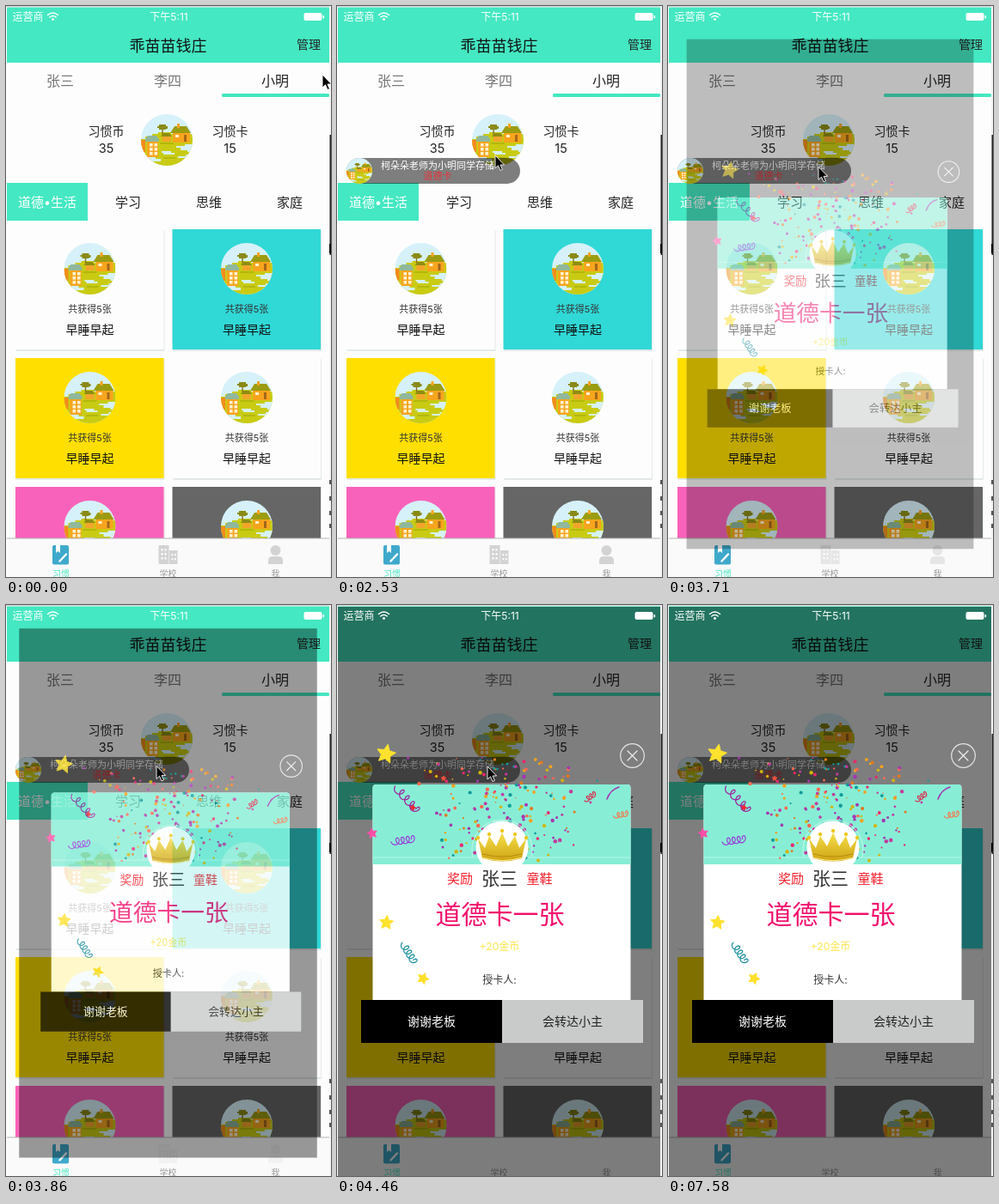
An HTML page for the animation above (7680 ms loop, 378 by 665 pixels).

```html
<!DOCTYPE html>
<html lang="zh-CN">
<head>
<meta charset="utf-8">
<title>习惯卡</title>
<style>
html, body { margin: 0; width: 100%; height: 100%; overflow: hidden; background: #fdfdfd; }
svg { display: block; width: 100vw; height: 100vh; }
text { font-family: Inter, "Noto Sans CJK SC", "Noto Sans CJK", sans-serif; text-anchor: middle; }
</style>
</head>
<body>
<svg id="stage" viewBox="0 0 378 665"></svg>
<script>
const LOOP = 7680, STEP = 148.3;
const MINT = '#44e8c2';
const $ = id => document.getElementById(id);

const rect = (x, y, w, h, fill, extra = '') =>
  `<rect x="${x}" y="${y}" width="${w}" height="${h}" fill="${fill}" ${extra}/>`;
const circle = (x, y, r, fill, extra = '') =>
  `<circle cx="${x}" cy="${y}" r="${r}" fill="${fill}" ${extra}/>`;
const path = (d, fill, extra = '') => `<path d="${d}" fill="${fill}" ${extra}/>`;
const line = (d, color, width = 1) =>
  path(d, 'none', `stroke="${color}" stroke-width="${width}" stroke-linecap="round"`);
// y is the visual middle of the line
const label = (s, x, y, size, fill, weight = 400) =>
  `<text x="${x}" y="${y + size * 0.37}" font-size="${size}" fill="${fill}" font-weight="${weight}">${s}</text>`;
const avatar = (x, y, r = 30) =>
  `<use href="#avatar" transform="translate(${x} ${y}) scale(${r / 30})"/>`;

function scene() {
  const sky = '#d6f1f9', orange = '#f7a51d', roof = '#9c9c10';
  let windows = '';
  for (let i = 0; i < 6; i++)
    windows += rect(-20 + (i % 2) * 5.5, 4 + (i >> 1) * 5, 3.6, 3.6, '#fff3d0');
  return `<clipPath id="round">${circle(0, 0, 30, '#000')}</clipPath>
  <g id="avatar"><g clip-path="url(#round)">
    ${rect(-30, -30, 60, 60, sky)}
    ${path('M-30 -1H-25V-4H-17V-7H-10V-9H5V-7H30V30H-30Z', '#c9cb13')}
    ${path('M-30 18h9v2h8v2h6v3h-11v2h-12zM30 5h-9v2h-10v2h5v3h8v2h6zM30 17h-8v2h-9v2h17zM-6 13h11v2h4v2h-13v-2h-2z', sky)}
    ${path('M-8 3H8V5H-8zM-4 20H10V22H-4z', '#b3b80c')}
    ${line('M-5 -13V-7', '#8a6a20', 1.4)}
    ${path('M-11 -14v-2h2v-2h8v2h2v3h-2v1h-8v-2z', '#8a8a14')}
    ${rect(-23, 0, 13, 20, orange)}${windows}
    ${path('M-25 2V-1L-22 -5H-12L-9 -1V2Z', '#8fb89c')}
    ${rect(-30, 0, 5, 14, '#f28c1c')}
    ${rect(7, -9, 20, 12, orange)}
    ${path('M4 -8L9 -16H23L28 -8Z', roof)}
    ${rect(12, -19, 3, 5, orange)}
    ${rect(10, -6, 4, 3, '#fff3d0')}${rect(20, -6, 3, 8, '#a5681a')}
    ${rect(-5, -4, 10, 6, '#f3a52a')}${path('M-7 -4L-4 -8H3L6 -4Z', '#8d8d12')}
  </g></g>`;
}

const card = (x, y, fill) =>
  rect(x + 0.5, y + 1, 173, 141, '#e3eae8', 'rx="1"') + rect(x, y, 172.5, 140, fill) +
  avatar(x + 86.5, y + 46) +
  label('共获得5张', x + 86.5, y + 93, 11, '#333') +
  label('早睡早起', x + 86.5, y + 117, 14, '#111');

function page() {
  const dark = '#222', white = '#fdfdfd';
  return rect(0, 0, 378, 665, white) + rect(0, 0, 378, 1, '#d5d5d5') +
    rect(1, 1.5, 375, 64.5, MINT) +
    label('乖苗苗钱庄', 188.5, 46, 18, '#111', 500) + label('管理', 352, 45, 14, dark) +
    label('张三', 63, 87, 16, '#777') + label('李四', 188, 87, 16, '#777') +
    label('小明', 313, 87, 16, dark, 500) + rect(251, 102, 125, 4, MINT, 'rx="1.5"') +
    label('习惯币', 116.5, 146, 14, dark) + label('35', 116.5, 166, 14.5, dark) +
    label('习惯卡', 260.5, 146, 14, dark) + label('15', 260.5, 166, 14.5, dark) +
    avatar(187, 156) +
    rect(1, 206, 94, 44, MINT) + label('道德•生活', 48, 228, 15, '#fff', 500) +
    ['学习', '思维', '家庭'].map((s, i) => label(s, 142 + 94 * i, 228, 15, dark, 500)).join('') +
    card(11, 260, white) + card(193.5, 260, '#30d8d6') +
    card(11, 410, '#ffdf00') + card(193.5, 410, white) +
    card(11, 560, '#f962ba') + card(193.5, 560, '#666');
}

function tabBar() {
  const gray = '#d3d3d3';
  let holes = '';
  for (let i = 0; i < 6; i++) holes += rect(180.5 + (i % 2) * 4, 632 + (i >> 1) * 5, 2, 2.5, '#fff');
  for (let i = 0; i < 4; i++) holes += rect(192.5 + (i % 2) * 3.5, 638 + (i >> 1) * 5, 1.8, 2.2, '#fff');
  return rect(1, 620, 375, 45, '#fafafa') + rect(1, 619.5, 375, 1, '#b5b5b5') +
    rect(54, 628, 19, 22.5, '#3fa9cb', 'rx="2"') +
    path('M58 628h5v9l-2.5 -2l-2.5 2z', '#fff') + line('M62.5 646.5L70 638.5', '#fff', 2.4) +
    `<g id="tabIcons">${rect(177.5, 628, 12, 22, gray)}${rect(190, 634, 9.5, 16, gray)}${holes}
     ${circle(313.5, 634, 6, gray)}${path('M305 650v-4q0 -5 5 -5h7q5 0 5 5v4z', gray)}</g>` +
    label('习惯', 64, 661.5, 10, MINT) + label('学校', 188.5, 661.5, 10, '#999') +
    label('我', 313.5, 661.5, 10, '#999');
}

const bubble = () => `<g id="bubble">${rect(0, 177, 202, 30, '#000', 'rx="15" fill-opacity=".5"')}
  ${avatar(15, 192, 15)}${label('柯朵朵老师为小明同学存储', 106, 186, 11, '#fff')}
  ${label('道德卡', 106, 197.5, 11, '#e8343c')}</g>`;

function star(x, y, r, fill, turn) {
  let pts = '';
  for (let i = 0; i < 10; i++) {
    const a = turn + i * Math.PI / 5, k = i % 2 ? r * 0.48 : r;
    pts += `${(x + k * Math.sin(a)).toFixed(1)},${(y - k * Math.cos(a)).toFixed(1)} `;
  }
  return `<polygon points="${pts}" fill="${fill}" stroke="${fill}" stroke-linejoin="round"/>`;
}

function coil(x, y, length, r, turns, angle, color) {
  let d = '';
  for (let i = 0; i <= turns * 14; i++) {
    const u = i / (turns * 14), a = u * turns * 2 * Math.PI;
    d += `${i ? 'L' : 'M'}${((u - 0.5) * length - r * 0.8 * Math.cos(a)).toFixed(1)} ${(r * Math.sin(a)).toFixed(1)}`;
  }
  return `<g transform="translate(${x} ${y}) rotate(${angle})">${line(d, color, 1.2)}</g>`;
}

function confetti() {
  const colors = ['#f2a11f', '#e8286c', '#a436b0', '#109c9c', '#ff6a50', '#d2b40c', '#c23ca0', '#e07a20'];
  let seed = 11, out = '';
  const rnd = () => (seed = seed * 16807 % 2147483647) / 2147483647;
  for (let i = 0; i < 210; i++) {
    const v = rnd(), x = 198 + (rnd() + rnd() - 1) * (122 - 40 * v);
    out += circle(x.toFixed(1), (178 + 120 * v).toFixed(1), (0.8 + rnd() * 1.5).toFixed(1),
      colors[Math.floor(rnd() * colors.length)]);
  }
  return out;
}

function crown() {
  const tips = [[164, 271], [177, 267], [192, 263], [207, 267], [220, 271]];
  return path('M164 272L172 283L177 269L185 281L192 265L199 281L207 269L212 283L220 272L215 295Q192 302 169 295Z',
      'url(#gold)') +
    line('M169 290Q192 296 215 290', '#b98d10', 1.2) + line('M170 294.5Q192 301 214 294.5', '#f9ec8c', 1.2) +
    tips.map(([x, y]) => circle(x, y, 2.2, '#ecc91f')).join('');
}

function modal() {
  const red = '#f5222d';
  return `<linearGradient id="gold" x2="0" y2="1"><stop stop-color="#f6e04a"/><stop offset="1" stop-color="#cfa313"/></linearGradient>
  <g id="modal">` +
    rect(1, 2, 375, 667, '#000', 'fill-opacity=".5"') +
    path('M41.5 460V213q0 -4 4 -4H337.5q4 0 4 4V460Z', '#fff') +
    path('M41.5 302V213q0 -4 4 -4H337.5q4 0 4 4V302Z', '#87eed5') +
    rect(41.5, 293.5, 300, 1, '#b5f5e6') + confetti() +
    path('M158 293.5A35 35 0 1 1 226 293.5', 'none', 'stroke="#c4f7ea"') +
    circle(192, 282, 30.5, '#fff') + crown() +
    star(57, 173.5, 11.5, '#ffe22e', 0.2) + star(57.5, 370, 8.5, '#ffe22e', 0.1) +
    star(100, 435, 7, '#ffdf2a', 0.4) + star(41, 266, 6, '#ff4fa8', -0.2) +
    star(88, 236, 3.5, '#f5222d', 0.3) + star(124, 202, 3, '#f0503c', 0) +
    coil(82, 227, 36, 4.5, 4, 48, '#a01c9c') + coil(78, 274, 24, 4, 4, -8, '#9a3ad8') +
    coil(84, 406, 24, 4, 4, 58, '#1c8fa0') + coil(295, 223, 13, 2.8, 3, -35, '#d83050') +
    coil(331, 244, 15, 3, 3, -10, '#f07a50') + line('M314 226Q318 215 328 212', '#a436b0', 1.6) +
    circle(343.5, 175.5, 13.8, 'none', 'stroke="#e4e4e4" stroke-width="1.2"') +
    line('M338 170L349 181M349 170L338 181', '#eee', 1.2) +
    label('奖励', 143, 318.5, 15, red) + label('张三', 189, 318.5, 21, '#333') +
    label('童鞋', 235.5, 318.5, 15, red) +
    label('道德卡一张', 189.5, 360, 30, '#f2106c') +
    label('+20金币', 189, 397.5, 12, '#fbe64a') + label('授卡人:', 189, 436.5, 12, '#333') +
    rect(28, 460, 164, 50, '#000') + rect(192, 460, 164, 50, '#c9cbca') +
    label('谢谢老板', 110, 485, 14, '#fff') + label('会转达小主', 274, 485, 14, '#222') + '</g>';
}

const statusBar = () => label('运营商', 25.5, 12.5, 12, '#fff') + label('下午5:11', 189.5, 12.5, 12, '#fff') +
  line('M48.5 10.5Q54.5 5.5 60.5 10.5M50.8 13Q54.5 10 58.2 13', '#fff', 1.6) +
  circle(54.5, 15.5, 1.6, '#fff') +
  rect(346.5, 8, 21, 9, '#fff', 'rx="2"') + rect(368.5, 11, 1.6, 3.5, '#fff', 'rx=".8"');

// sliver of the window behind the phone
const behind = () => rect(376, 0, 2, 665, '#f4f4f4') + rect(376.5, 150, 1.5, 140, '#222') +
  rect(376, 277, 2, 11, '#000') + [552, 571, 588, 603].map(y => rect(376, y, 2, 5, '#555')).join('');

const cursor = () => path('M0 0V15L3.5 11.8L6 17.5L8.4 16.4L6 11H10.6Z', '#000',
  'id="cursor" stroke="#fff" stroke-width=".9"');

$('stage').innerHTML = `<defs>${scene()}</defs>` + page() + tabBar() + bubble() + modal() +
  statusBar() + behind() + cursor();

// keys: [step, ...values]
function follow(keys, k) {
  const i = keys.findIndex(p => p[0] > k);
  if (i === 0) return keys[0].slice(1);
  if (i < 0) return keys[keys.length - 1].slice(1);
  const a = keys[i - 1], b = keys[i], u = (k - a[0]) / (b[0] - a[0]);
  return a.slice(1).map((v, j) => v + (b[j + 1] - v) * u);
}

const POINTER = [[0, 368, 80], [8, 356, 44], [9, 354, 43], [15, 186, 180], [17, 184, 174],
  [20, 180, 166], [23, 175, 187], [30, 175, 188], [34, 357, 184], [36, 357, 184], [42, 305, 608]];
const POP = [[22.7, 0.1], [23, 0.387], [24, 0.846], [25, 0.89], [26, 0.924], [28, 0.975], [30, 1]];

// remaining distance of a damped spring, 1 to 0
function spring(sec) {
  if (sec <= 0) return 1;
  const z = 0.755, w = 9.3, d = Math.sqrt(1 - z * z), a = w * d * sec;
  return Math.exp(-z * w * sec) * (Math.cos(a) + z / d * Math.sin(a));
}

function ease(u) {
  u = Math.max(0, Math.min(1, u));
  return u * u * (3 - 2 * u);
}

function draw(ms) {
  const k = Math.floor(ms / STEP);

  const left = spring((k * STEP - 1085) / 1000);
  $('bubble').setAttribute('transform', `translate(${11 + 367 * left} 0)`);
  $('bubble').setAttribute('opacity', Math.min(1, 1.08 * (1 - left)));

  const alpha = ease((k - 22.6) / 4.8);
  const [s] = follow(POP, k);
  $('modal').setAttribute('opacity', alpha);
  $('modal').setAttribute('transform', `translate(188.5 335.5) scale(${s}) translate(-188.5 -335.5)`);
  $('tabIcons').setAttribute('opacity', 1 - alpha);

  const [x, y] = follow(POINTER, k);
  $('cursor').setAttribute('transform', `translate(${x} ${y})`);
  $('cursor').setAttribute('visibility', k < 42 ? 'visible' : 'hidden');
}

const start = performance.now();
function tick() {
  draw((performance.now() - start) % LOOP);
  requestAnimationFrame(tick);
}
tick();
</script>
</body>
</html>
```
